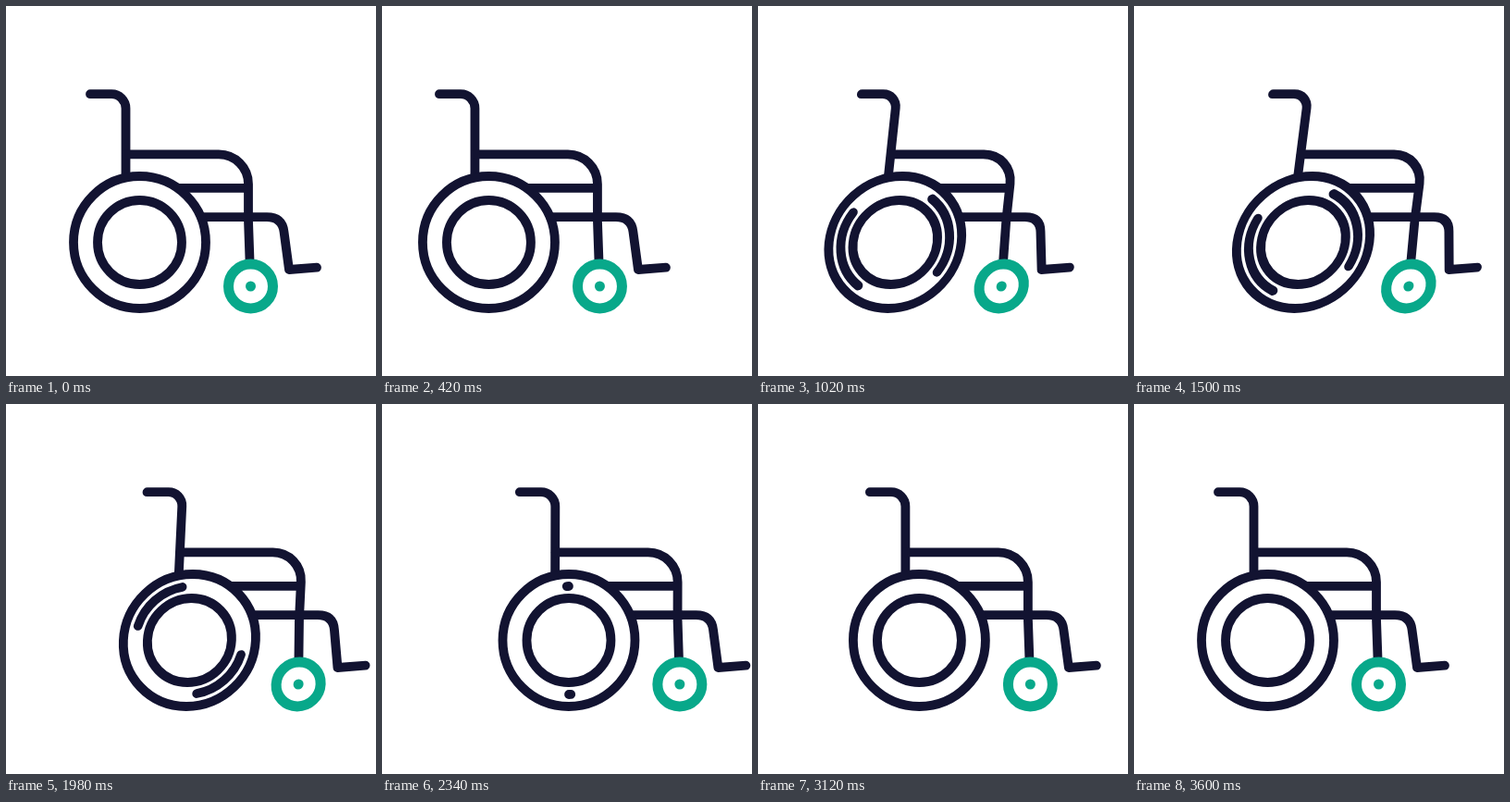
An HTML page that plays this animation: 400x400 px, repeating every 5130 ms.

```html
<!DOCTYPE html>
<html lang="en">
<head>
<meta charset="utf-8">
<title>Rolling wheelchair</title>
<style>
  html, body { margin: 0; height: 100%; overflow: hidden; background: #fff; }
  svg { display: block; width: 100%; height: 100%; }
  g { fill: none; stroke: #121331; stroke-width: 9.8; stroke-linecap: round; stroke-linejoin: round; }
  .caster { stroke: #08a88a; stroke-width: 11; }
  .hub { stroke: none; fill: #08a88a; }
</style>
</head>
<body>
<svg viewBox="0 0 400 400">
  <g id="chair">
    <path d="M91 95.200H114a15.500 15.500 0 0 1 15.500 15.500V184"/>
    <path d="M130 160.400H230a32 32 0 0 1 32 32V232L263.500 275"/>
    <path d="M187 196.800H261"/>
    <path d="M211 228.200H282Q298.500 228.200 300.500 244L306 285L336 282.700"/>
    <circle cx="144.500" cy="255.500" r="71.500"/>
    <circle cx="144.500" cy="255.500" r="45.500"/>
    <path id="streaks"/>
    <circle class="caster" cx="264.500" cy="303" r="24"/>
    <circle class="hub" cx="264.500" cy="303" r="5.500"/>
  </g>
</svg>
<script>
const LOOP = 5130, GROUND = 332;
const chair = document.getElementById('chair');
const streaks = document.getElementById('streaks');

// Progress 0..1 between two times, eased like cubic-bezier(a, 0, b, 1).
function ease(t, from, to, a = 1 / 3, b = 2 / 3) {
  const u = Math.min(1, Math.max(0, (t - from) / (to - from)));
  let lo = 0, hi = 1;
  for (let i = 0; i < 24; i++) {
    const s = (lo + hi) / 2, r = 1 - s;
    if (3 * s * r * (r * a + s * b) + s ** 3 < u) lo = s; else hi = s;
  }
  return lo * lo * (3 - 2 * lo);
}

// Back up, roll forward past the stop, settle, return.
const shift = t => -30 * ease(t, 0, 470) + 88 * ease(t, 510, 2500, 0.21, 0.48)
  - 8 * ease(t, 2400, 2700) - 50 * ease(t, 2700, 3600, 0.667, 0.333);
const lean = t => 0.144 * (ease(t, 540, 1260) - ease(t, 1260, 2430));
const spin = t => 360 * ease(t, 540, 2400, 0.35, 0.16) - 90;
const span = t => 90 * (ease(t, 540, 1080) - ease(t, 1750, 2400));

function arc(from, to) {
  const point = deg => {
    const r = deg * Math.PI / 180;
    return `${144.5 + 58.5 * Math.cos(r)} ${255.5 + 58.5 * Math.sin(r)}`;
  };
  return `M${point(from)}A58.5 58.5 0 0 1 ${point(to)}`;
}

function draw(now) {
  const t = now % LOOP;
  const k = lean(t), head = spin(t), size = span(t);
  chair.setAttribute('transform', `matrix(1 0 ${-k} 1 ${shift(t) + k * GROUND} 0)`);
  streaks.setAttribute('d', size > 0.5 ? arc(head - size, head) + arc(head - size + 180, head + 180) : '');
}

let start;
function frame(now) {
  start ??= now;
  draw(now - start);
  requestAnimationFrame(frame);
}
draw(0);
requestAnimationFrame(frame);
</script>
</body>
</html>
```
